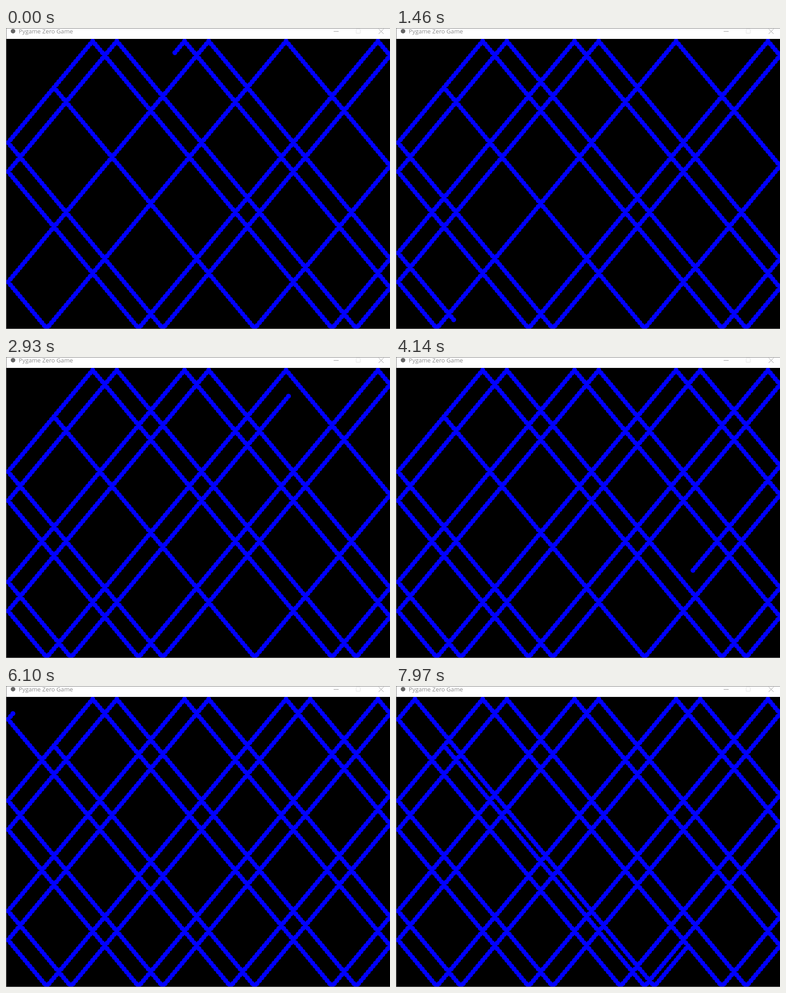
An HTML page with a canvas for the animation above (8 s loop, 845 by 662 pixels).

```html
<!DOCTYPE html>
<html lang="en">
<head>
<meta charset="utf-8">
<title>Bouncing trail</title>
<style>
  html, body { margin: 0; width: 100%; height: 100%; overflow: hidden; background: #fff; }
  svg, canvas { position: absolute; left: 0; top: 0; }
  canvas { left: 1px; top: 24px; }
  text { font: 13.1px "Open Sans", "Noto Sans", sans-serif; fill: #8c8c8c; }
</style>
</head>
<body>
<svg width="845" height="662">
  <rect width="845" height="662" fill="#777"/>
  <rect x="1" y="1" width="844" height="23" fill="#fff"/>
  <circle cx="15.5" cy="7" r="5" fill="#666"/>
  <text x="28" y="12">Pygame Zero Game</text>
  <g fill="none" stroke="#999">
    <path d="M721 7.5H732"/>
    <path d="M770.5 2.5h9v9h-9z" stroke="#e2e2e2"/>
    <path d="M820 2l11 11M831 2l-11 11"/>
  </g>
</svg>
<canvas id="view" width="844" height="637"></canvas>
<script>
const LOOP = 8000;
const FRAME = LOOP / 176;      // the screen refreshes at this pace
const STEPS_PER_MS = 0.0636;
const FIRST_STEPS = 1176;      // steps already taken when the loop begins

// The ball moves diagonally, one cell per step, and bounces off the walls.
const SCALE = 1.064;
const COLUMNS = { size: 158, start: 19, cell: 5 * SCALE, offset: 3.5 };
const ROWS = { size: 99, start: 16, cell: 6 * SCALE, offset: 4.7 };
const RADIUS = 5.4;

const view = document.getElementById("view");
const ctx = view.getContext("2d");

function bounce(axis, step) {
  const lap = (axis.start + step) % (2 * axis.size);
  return axis.offset + axis.cell * Math.min(lap, 2 * axis.size - lap);
}

function drawTrail(steps) {
  ctx.fillStyle = "#000";
  ctx.fillRect(0, 0, view.width, view.height);
  ctx.fillStyle = "#00f";
  ctx.beginPath();
  for (let step = 0; step <= steps; step++) {
    const x = bounce(COLUMNS, step);
    const y = bounce(ROWS, step);
    ctx.moveTo(x + RADIUS, y);
    ctx.arc(x, y, RADIUS, 0, 2 * Math.PI);
  }
  ctx.fill();
}

const began = performance.now();
let shown = -1;

function render() {
  const time = (performance.now() - began) % LOOP;
  const frameTime = Math.floor(time / FRAME) * FRAME;
  const steps = FIRST_STEPS + Math.floor(frameTime * STEPS_PER_MS);
  if (steps !== shown) drawTrail(steps);
  shown = steps;
  requestAnimationFrame(render);
}
render();
</script>
</body>
</html>
```
